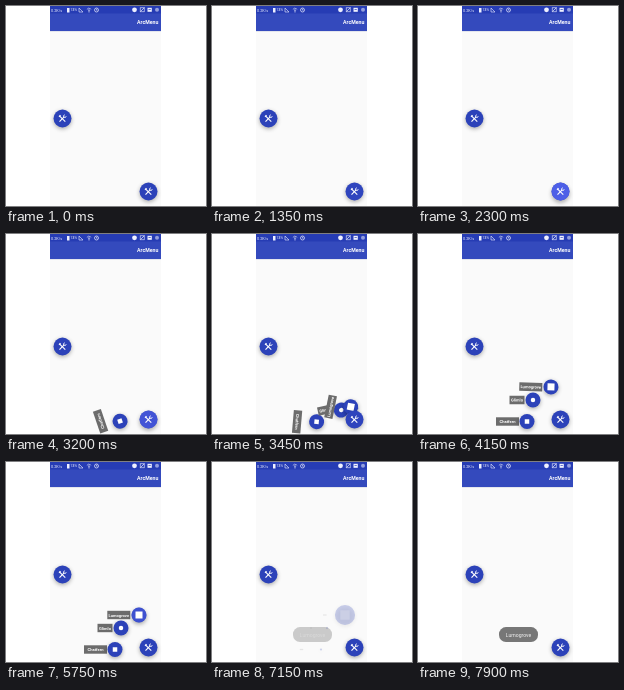
Write an HTML page with a canvas that moves like this. It is 200 px wide and 200 px high and loops after 8000 ms.

```html
<!DOCTYPE html>
<html lang="en">
<head>
<meta charset="utf-8">
<title>ArcMenu</title>
<style>
html, body { margin: 0; width: 100%; height: 100%; overflow: hidden; background: #fff; }
canvas { display: block; width: 200px; height: 200px; }
</style>
</head>
<body>
<canvas id="stage"></canvas>
<script>
const LOOP = 8000, BLUE = '#2c42b9', PRESSED = [84, 100, 238];
const canvas = document.getElementById('stage');
const ctx = canvas.getContext('2d');
const scale = window.devicePixelRatio || 1;
canvas.width = canvas.height = 200 * scale;

const HUB = { x: 142.5, y: 185.5 };
const items = [
  { name: 'Chatfern', x: 109, y: 187.5, labelX: 89.5, w: 23, start: 3005, mark: 'square', size: 4.5 },
  { name: 'Glimlo', x: 115, y: 166, labelX: 99, w: 15, start: 3360, mark: 'circle', size: 4.5 },
  { name: 'Lumogrove', x: 133, y: 153, labelX: 112.8, w: 23, start: 3380, mark: 'square', size: 7 }
];

const ramp = (t, a, b) => Math.min(1, Math.max(0, (t - a) / (b - a)));
const overshoot = t => 1 + (t - 1) ** 2 * (3 * (t - 1) + 2);

function at(x, y, draw, angle = 0, size = 1, alpha = 1) {
  if (size <= 0 || alpha <= 0) return;
  ctx.save();
  ctx.translate(x, y);
  ctx.rotate(angle);
  ctx.scale(size, size);
  ctx.globalAlpha = alpha;
  draw();
  ctx.restore();
}

function rect(x, y, w, h, color) {
  ctx.fillStyle = color;
  ctx.fillRect(x, y, w, h);
}

function disc(x, y, r, color) {
  ctx.fillStyle = color;
  ctx.beginPath();
  ctx.arc(x, y, r, 0, 7);
  ctx.fill();
}

function text(str, x, y, font, color, align = 'center') {
  ctx.font = font + ' Roboto, sans-serif';
  ctx.fillStyle = color;
  ctx.textAlign = align;
  ctx.textBaseline = 'middle';
  ctx.fillText(str, x, y);
}

function line(width, color, ...p) {
  ctx.strokeStyle = color;
  ctx.lineWidth = width;
  ctx.beginPath();
  for (let i = 0; i < p.length; i += 2) ctx.lineTo(p[i], p[i + 1]);
  ctx.stroke();
}

function button(r, light) {
  ctx.save();
  ctx.shadowColor = 'rgba(0,0,0,.32)';
  ctx.shadowBlur = 4 * scale;
  ctx.shadowOffsetY = (1.4 + light) * scale;
  disc(0, 0, r, BLUE);
  ctx.restore();
  if (light) disc(0, 0, r, `rgba(${PRESSED},${light})`);
}

function tools() {
  line(1.1, '#fff', -2.6, -2.2, 2.8, 3.2);
  line(1.1, '#fff', -3, 3.2, 1.6, -1.6);
  line(1.5, '#fff', -3.4, -1.8, -2, -3.2);
  ctx.strokeStyle = '#fff';
  ctx.lineWidth = 1;
  ctx.beginPath();
  ctx.arc(2.4, -2.4, 1.3, .2, 4.5);
  ctx.stroke();
}

function fab(x, y, light) {
  at(x, y, () => { button(9, light); tools(); });
}

function statusBar() {
  const white = '#eef0ff';
  rect(44, 0, 111, 7.5, '#263cb4');
  text('0.2K/s', 45, 4.5, '3.8px', white, 'left');
  rect(61, 2, 2.5, 4.5, white);
  text('74%', 64.5, 4.3, '3.5px', white, 'left');
  line(.6, white, 73, 2, 73, 6, 77, 6, 73, 2);
  for (const r of [1.2, 2.7]) {
    ctx.beginPath();
    ctx.arc(83, 5, r, 3.8, 5.6);
    ctx.stroke();
  }
  line(.7, white, 83, 4, 83, 6.5);
  ctx.beginPath();
  ctx.arc(90.5, 4, 2, 0, 7);
  ctx.stroke();
  line(.6, white, 90.5, 2.8, 90.5, 4.2, 91.5, 4.2);
  disc(128.5, 3.8, 2.4, white);
  ctx.strokeRect(134.2, 1.8, 4, 4);
  line(.7, white, 135, 5, 138.5, 1.5);
  rect(141.5, 1.8, 4.3, 4, white);
  rect(142.5, 3.2, 2.3, .7, BLUE);
  disc(151, 3.8, 2, 'rgba(238,240,255,.55)');
}

function screen() {
  rect(0, 0, 200, 200, '#fff');
  rect(44, 0, 111, 200, '#fafafa');
  rect(44, 7, 111, 18, '#344abd');
  rect(44, 25, 111, .7, '#dcdfe9');
  statusBar();
  text('ArcMenu', 152.3, 16.8, 'bold 5.2px', '#fff', 'right');
}

function menuItem(item, t, chosen) {
  if (t < item.start) return;
  const p = overshoot(ramp(t, item.start, item.start + 800));
  const angle = (p - 1) * 4 * Math.PI;
  const gone = ramp(t, 6750, 7220);
  const x = HUB.x + (item.x - HUB.x) * p;
  const y = HUB.y + (item.y - HUB.y) * p;
  const light = chosen ? .6 * ramp(t, 5150, 5950) * (1 - gone) : 0;

  at(x + item.labelX - item.x, y, () => {
    rect(-item.w / 2, -4.2, item.w, 8.4, '#6c6c6c');
    text(item.name, 0, .3, 'bold 4.1px', '#fff');
  }, angle, 1 - gone, 1 - gone);

  at(x, y, () => {
    button(7.5, light);
    const s = item.size;
    if (item.mark === 'circle') disc(0, 0, s / 2, '#fff');
    else rect(-s / 2, -s / 2, s, s, '#fff');
  }, angle, chosen ? 1 + .4 * gone : 1 - gone, 1 - .92 * gone - .08 * (gone === 1));
}

function toast(t) {
  at(100.5, 172.6, () => {
    ctx.fillStyle = '#777';
    ctx.beginPath();
    ctx.roundRect(-19.5, -7.5, 39, 15, 7);
    ctx.fill();
    text('Lumogrove', 0, .4, '5.1px', '#f4f4f4');
  }, 0, 1, ramp(t, 6980, 7450));
}

function frame(now) {
  const t = now % LOOP;
  ctx.setTransform(scale, 0, 0, scale, 0, 0);
  screen();
  fab(56.5, 112.5, 0);
  items.forEach((item, i) => menuItem(item, t, i === 2));
  fab(HUB.x, HUB.y, .85 * ramp(t, 1250, 2250) * (1 - ramp(t, 3050, 3500)));
  toast(t);
}

const began = performance.now();
function tick() {
  frame(performance.now() - began);
  requestAnimationFrame(tick);
}
tick();
</script>
</body>
</html>
```
